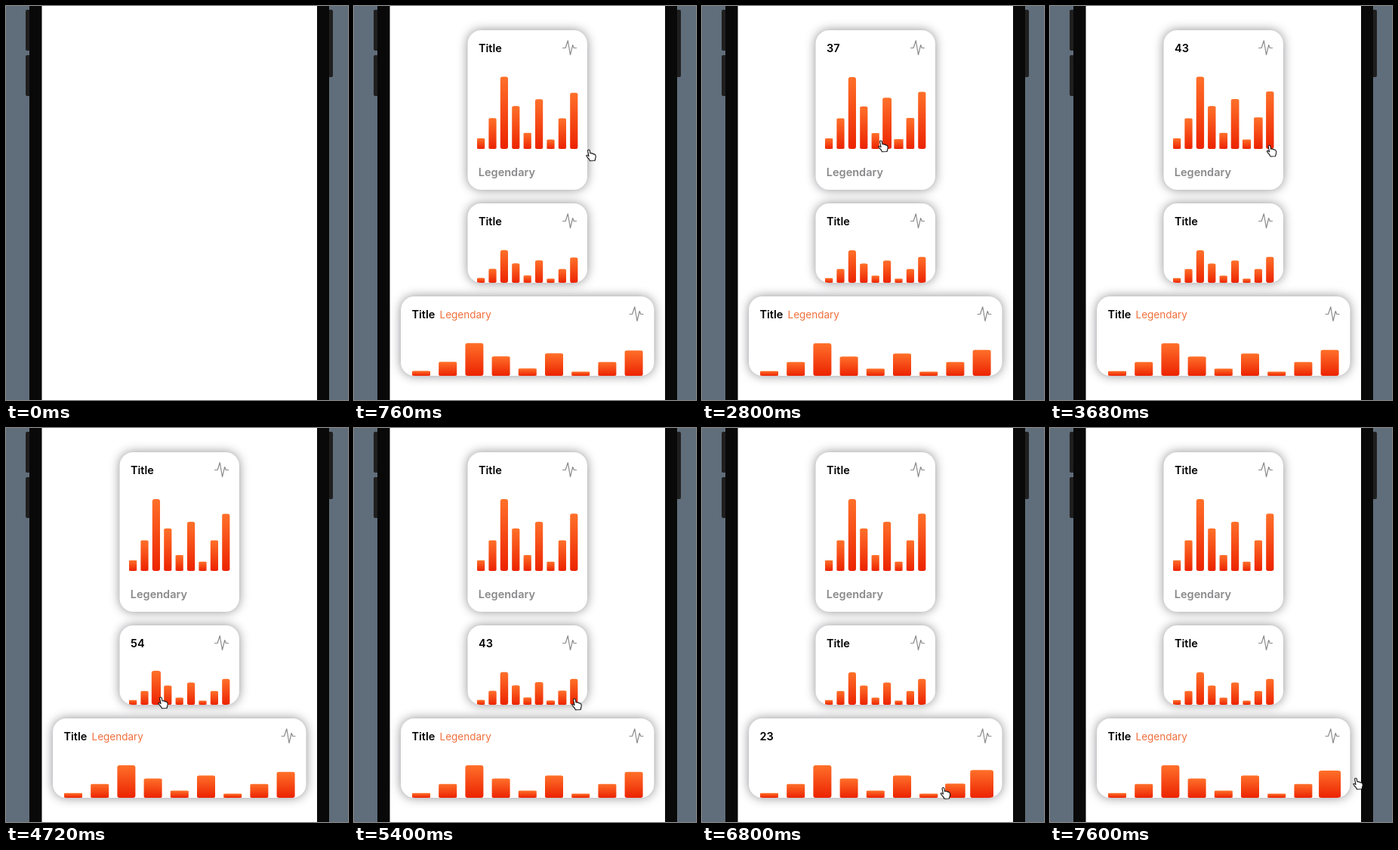
These frames come from a looping animation (453x521 px, 7640 ms). An HTML page:

```html
<!DOCTYPE html>
<html lang="en">
<head>
<meta charset="utf-8">
<title>Bar chart cards</title>
<style>
  html, body { margin: 0; width: 100%; height: 100%; overflow: hidden; background: #606d7a; }
  svg { display: block; }
  text { font-family: Inter, Roboto, sans-serif; }
  .title { font-size: 14.5px; font-weight: 600; fill: #000; }
  .footer { font-size: 14.5px; font-weight: 600; fill: #89898b; }
  .legend { font-size: 13.5px; fill: #f0703c; }
  .card { fill: #fff; filter: drop-shadow(0 0 7px #8e8e93); }
  .pulse { fill: none; stroke: #8c8c8e; stroke-width: 1.2; stroke-linejoin: round; stroke-linecap: round; }
  .button { fill: #1f1f1f; }
</style>
</head>
<body>
<svg id="stage" width="453" height="521" viewBox="0 0 453 521">
  <defs>
    <linearGradient id="fire" x1="0" y1="1" x2="0" y2="0">
      <stop offset="0" stop-color="#ec2301"/>
      <stop offset="1" stop-color="#ff702a"/>
    </linearGradient>
  </defs>
  <rect class="button" x="26" y="5" width="10" height="54" rx="2"/>
  <rect class="button" x="26" y="65" width="10" height="54" rx="2"/>
  <rect class="button" x="423" y="5" width="10" height="89" rx="2"/>
  <rect x="31" width="397" height="521" fill="#090909"/>
  <rect x="47.5" width="364.5" height="521" fill="#fff"/>
  <g id="cards"></g>
  <path id="hand" fill="#fff" stroke="#111" stroke-width="1.1" stroke-linejoin="round"
    d="M-1.4 1.2Q-1.2 0 0 0Q1.2 0 1.4 1.3L2 5Q3.3 4 4.2 5.3Q5.6 4.6 6.4 6Q8 5.4 8.7 7Q9.8 9 8.8 11.5L8 14.5L1.5 14.8Q1 12.5 -1.5 10.5Q-3.6 8.3 -3 7.4Q-1.8 6.7 0 8.6Z"/>
</svg>
<script>
const LOOP = 7640, STEP = 40, SHOW = 160, GROW = 90, LAG = 40, STAGGER = 40, FADE = 350;
const values = [8, 23, 54, 32, 12, 37, 7, 23, 43];
const peak = Math.max(...values);

// press and release: times of the drag over each card
const cards = [
  { x: 150.5, y: 32, w: 158.5, h: 211, barX: 163, pitch: 15.4, barW: 10.2, base: 189, barH: 95, press: 1480, release: 3800 },
  { x: 150.5, y: 261, w: 158.5, h: 105, barX: 163, pitch: 15.4, barW: 10.2, base: 366, barH: 43, press: 4590, release: 5450 },
  { x: 62, y: 384, w: 335.5, h: 105, barX: 77, pitch: 35.2, barW: 24, base: 489, barH: 43, press: 5920, release: 7150 }
];

// pointer path: time, x, y of the fingertip
const path = [
  [160, 448, 250], [760, 311, 190], [1400, 170, 187], [1560, 194, 184], [1680, 218, 182.5],
  [2150, 290, 178], [2640, 256, 177], [2800, 237, 178], [3150, 170, 181], [3650, 290, 184],
  [3850, 292, 186], [4250, 225, 330], [4480, 208, 353], [4720, 205, 356], [4950, 170, 358],
  [5400, 292, 358], [5500, 290, 365], [5850, 203, 466], [6080, 201, 474.5], [6600, 375, 474],
  [6900, 300, 476], [7150, 378, 470], [7600, 405, 463]
];

const clamp = (v, lo, hi) => Math.min(hi, Math.max(lo, v));
const easeOut = u => 1 - (1 - clamp(u, 0, 1)) ** 2;

// response of a damped spring to a unit step
function spring(ms) {
  if (ms <= 0) return 0;
  const s = ms / 1000, damping = 0.825, w = 2 * Math.PI / 0.55;
  const k = damping * w, wd = w * Math.sqrt(1 - damping * damping);
  return 1 - Math.exp(-k * s) * (Math.cos(wd * s) + k / wd * Math.sin(wd * s));
}

function secant(i, axis) {
  const a = path[i], b = path[i + 1];
  return a && b ? (b[axis] - a[axis]) / (b[0] - a[0]) : 0;
}

function slope(i, axis) {
  const p = secant(i - 1, axis), q = secant(i, axis);
  return p * q > 0 ? 2 * p * q / (p + q) : 0;
}

// monotone cubic through the path points
function pointer(t, axis) {
  t = clamp(t, path[0][0], path[path.length - 1][0]);
  let i = 0;
  while (i < path.length - 2 && t > path[i + 1][0]) i++;
  const a = path[i], b = path[i + 1], d = b[0] - a[0], u = (t - a[0]) / d;
  const s = u * u * (3 - 2 * u);
  return a[axis] + (b[axis] - a[axis]) * s +
    d * (slope(i, axis) * u * (1 - u) ** 2 + slope(i + 1, axis) * u * u * (u - 1));
}

function touched(card, t) {
  if (t < card.press || t >= card.release) return -1;
  const i = Math.floor((pointer(t - LAG, 1) - card.barX) / card.pitch);
  return clamp(i, 0, values.length - 1);
}

function make(parent, name, attrs, content) {
  const el = document.createElementNS("http://www.w3.org/2000/svg", name);
  for (const key in attrs) el.setAttribute(key, attrs[key]);
  if (content) el.textContent = content;
  return parent.appendChild(el);
}

function build(card, n) {
  const { x, y, w, h, barW, barH } = card;
  const box = { x, y, width: w, height: h, rx: 18 };
  const g = make(document.getElementById("cards"), "g", {});
  make(make(g, "clipPath", { id: "clip" + n }), "rect", box);
  make(g, "rect", { class: "card", ...box });
  card.title = make(g, "text", { class: "title", x: x + 14.5, y: y + 28.8 }, "Title");
  if (n === 0) make(g, "text", { class: "footer", x: x + 14.3, y: y + 193 }, "Legendary");
  if (n === 2) card.legend = make(g, "text", { class: "legend", x: x + 51.5, y: y + 28.5 }, "Legendary");
  make(g, "path", {
    class: "pulse", d: "M0 10.5H3.6L6.8 .8L10 19.5L13.2 6.5L14.8 10.5H18",
    transform: `translate(${x + w - 32.5} ${y + 13})`
  });
  const plot = make(g, "g", { "clip-path": `url(#clip${n})` });
  card.bars = values.map(() => make(plot, "rect", {
    x: -barW / 2, y: -barH, width: barW, height: barH, rx: 3, fill: "url(#fire)"
  }));

  // every time a bar gains (+1) or loses (-1) the touch
  card.changes = [];
  let last = -1;
  for (let t = 0; t < LOOP; t += 10) {
    const now = touched(card, t);
    if (now === last) continue;
    if (last >= 0) card.changes.push({ bar: last, sign: -1, t: t + (now < 0 ? last * STAGGER : 0) });
    if (now >= 0) card.changes.push({ bar: now, sign: 1, t });
    last = now;
  }
}

function drawCard(card, t) {
  const active = touched(card, t);
  card.title.textContent = active < 0 ? "Title" : values[active];
  if (card.legend) {
    const shown = 1 - easeOut((t - card.press) / FADE) + easeOut((t - card.release) / FADE);
    card.legend.setAttribute("opacity", shown);
  }
  card.bars.forEach((bar, i) => {
    const lift = card.changes.reduce((sum, c) => c.bar === i ? sum + c.sign * spring(t - c.t) : sum, 0);
    const grown = spring(t - GROW - i * STAGGER);
    const cx = card.barX + i * card.pitch + card.barW / 2;
    const sy = values[i] / peak * grown * (1 + 0.1 * lift);
    bar.setAttribute("transform", `translate(${cx} ${card.base}) scale(${1 + 0.4 * lift} ${sy})`);
  });
}

const cardLayer = document.getElementById("cards");
const hand = document.getElementById("hand");
cards.forEach(build);

function draw(now) {
  const t = Math.floor((now % LOOP) / STEP) * STEP;
  const visibility = t < SHOW ? "hidden" : "visible";
  cardLayer.setAttribute("visibility", visibility);
  hand.setAttribute("visibility", visibility);
  cards.forEach(card => drawCard(card, t));
  hand.setAttribute("transform", `translate(${pointer(t, 1)} ${pointer(t, 2)})`);
}

const start = performance.now();
function tick() {
  draw(performance.now() - start);
  requestAnimationFrame(tick);
}
tick();
</script>
</body>
</html>
```
